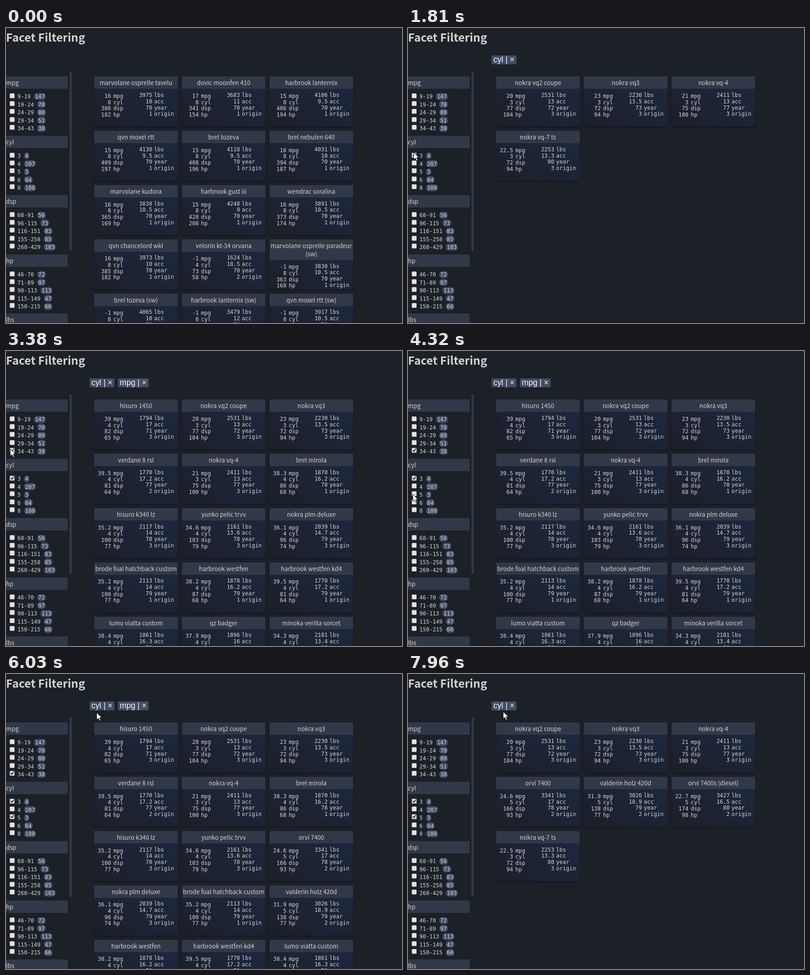
Write an HTML page that moves like this. It is 867x646 px and loops after 8000 ms.

```html
<!DOCTYPE html>
<html lang="en">
<head>
<meta charset="utf-8">
<title>Facet Filtering</title>
<style>
  html, body { margin: 0; width: 100%; height: 100%; overflow: hidden; background: #1c2027; }
  svg { display: block; width: 867px; height: 646px; }
  text { fill: #d5d3cf; font: 12px "DejaVu Sans Mono", monospace; }
  .name, .head { font: 13.2px "Noto Sans CJK JP", "Noto Sans CJK SC", "Noto Sans CJK", "Noto Sans", sans-serif; }
  .head { font-size: 24.7px; font-weight: 700; }
  .chip { font: 17.6px "Liberation Sans", Arial, sans-serif; fill: #f4f4f4; }
  .mid { text-anchor: middle; }
  .end { text-anchor: end; }
  .bar { fill: #313948; }
  .pill { fill: #414d67; }
  .box { fill: #e4e4e3; stroke: #a4a4a3; }
  .tick { fill: none; stroke: #2b2b2b; stroke-width: 2; }
  .ring { fill: none; stroke: #3d6bbb; stroke-width: 1.5; }
  .card { fill: url(#shade); filter: drop-shadow(0 1px 1px #0008); }
  .pointer { fill: #fff; stroke: #111; stroke-linejoin: round; }
  .beam { fill: none; stroke: #e8e8e8; }
</style>
</head>
<body>
<svg id="stage" viewBox="0 0 867 646"></svg>
<script>
const LOOP = 8000;
const STEP = 76.7;
const MONO = 7.22;

const namesByYear = {
  70: `marvolane osprelle tavelu, dovic moonfen 410, harbrook lanternix,
    qvn moxel rtt, brel tozeva, brel nebulen 640,
    marvolane kudora, harbrook gust iii, wendrac soralina,
    qvn chancelord wkl, velorin kt-34 orvana, marvolane osprelle paradeur|(sw),
    brel tozeva (sw), harbrook lanternix (sw), qvn moxel rtt (sw)`,
  71: 'hisuro 1450',
  72: 'nokra vq2 coupe',
  73: 'nokra vq3',
  77: 'verdane 8 rsl, nokra vq-4',
  78: 'brel mirola, hisuro k340 lz, yunko pelic trvv, orvi 7400',
  79: `nokra plm deluxe, brode foal hatchback custom, valderin holz 420d,
    harbrook westfen, harbrook westfen kd4, lumo viatta custom`,
  80: 'qz badger, minoka verilla sorcet, orvi 7400s (diesel), nokra vq-7 ts'
};

// Lightest to heaviest car for each number of cylinders
const ranges = {
  3: { mpg: [23.7, 18], dsp: [70, 80], hp: [90, 110], lbs: [2124, 2720], acc: [13.5, 12.5] },
  4: { mpg: [41.5, 34.1], dsp: [72, 105], hp: [58, 80], lbs: [1613, 2200], acc: [18.6, 13.2] },
  5: { mpg: [36.4, 20.3], dsp: [121, 183], hp: [67, 103], lbs: [2830, 3530], acc: [20.1, 15.9] },
  8: { mpg: [18, 14], dsp: [302, 455], hp: [130, 225], lbs: [3433, 4425], acc: [12, 8.5] }
};

function originOf(name) {
  if (/^(velorin|verdane|orvi|valderin|lumo)/.test(name)) return 2;
  return /^(hisuro|nokra|yunko|minoka)/.test(name) ? 3 : 1;
}

function cylindersOf(name, year, origin) {
  if (/ vq/.test(name)) return 3;
  if (/^(orvi|valderin)/.test(name)) return 5;
  return year === 70 && origin === 1 ? 8 : 4;
}

function makeCar(name, year, i) {
  const origin = originOf(name);
  const cyl = cylindersOf(name, year, origin);
  const weight = Math.abs(Math.sin(i * 12.9898 + 1) * 43758.5453) % 1;
  const spec = (key, unit = 1) => {
    const [light, heavy] = ranges[cyl][key];
    return +(Math.round((light + (heavy - light) * weight) / unit) * unit).toFixed(1);
  };
  const unrated = year === 70 && (origin === 2 || name.includes('(sw)'));
  return {
    name, year, origin, cyl,
    mpg: unrated ? -1 : spec('mpg', year < 77 ? 1 : 0.1),
    dsp: spec('dsp'), hp: spec('hp'), lbs: spec('lbs'),
    acc: spec('acc', year < 77 ? 0.5 : 0.1)
  };
}

const cars = Object.entries(namesByYear)
  .flatMap(([year, names]) => names.split(/,\s+/).map(name => [name, +year]))
  .map(([name, year], i) => makeCar(name, year, i));

const facets = {
  mpg: '9-19 147, 19-24 78, 24-29 80, 29-34 51, 34-43 38',
  cyl: '3 4, 4 207, 5 3, 6 84, 8 108',
  dsp: '68-91 56, 96-115 73, 116-151 83, 155-258 85, 260-429 103',
  hp: '46-70 72, 71-89 97, 90-113 113, 115-149 47, 150-215 66',
  lbs: ''
};

const scenes = [
  { at: 0, cyl: '', mpg: false },
  { at: 1810, cyl: '3', mpg: false },
  { at: 3380, cyl: '3', mpg: true },
  { at: 4780, cyl: '35', mpg: true },
  { at: 7270, cyl: '35', mpg: false }
];

// Stepped straight moves from the previous place
const moves = [
  { at: 190, steps: 4, x: -20, y: 240 },
  { at: 570, steps: 3, x: 18, y: 230 },
  { at: 890, steps: 7, x: 12, y: 272 },
  { at: 2050, steps: 2, x: 11, y: 295 },
  { at: 2510, steps: 1, x: 11, y: 284 },
  { at: 2660, steps: 3, x: 9, y: 214 },
  { at: 3850, steps: 7, x: 10, y: 313 },
  { at: 5480, steps: 1, x: 102, y: 314, shape: 'beam' },
  { at: 5557, steps: 5, x: 229, y: 57 },
  { at: 5940, steps: 2, x: 198, y: 84 },
  { at: 6430, steps: 1, x: 278, y: 86 },
  { at: 6580, steps: 3, x: 277, y: 66, shape: 'hand' },
  { at: 7270, steps: 3, x: 401, y: 80 },
  { at: 7730, steps: 4, x: 208, y: 82 }
];

// Whole-pixel baselines keep the small type crisp
const text = (x, y, str, cls = '') => `<text x="${x}" y="${Math.round(y)}" class="${cls}">${str}</text>`;
const rect = (x, y, w, h, cls, r = 0) =>
  `<rect x="${x}" y="${y}" width="${w}" height="${h}" rx="${r}" class="${cls}"/>`;
const facetTop = i => Math.round(106.4 + 129.75 * i);
const rowTop = (facet, row) => facetTop(facet) + 37 + 17.4 * row;

function facetPanel([title, rows], i) {
  const top = facetTop(i);
  let out = rect(0, top, 135, 27, 'bar') + text(0, top + 19, title, 'name');
  if (!rows) return out;
  rows.split(', ').forEach((row, j) => {
    const [label, count] = row.split(' ');
    const y = rowTop(i, j);
    const pillX = 25 + (label.length + 1) * MONO;
    out += rect(8.5, Math.floor(y) + 0.5, 10, 10, 'box', 1.5)
      + text(25, y + 11.3, label)
      + rect(pillX, Math.round(y) - 0.5, count.length * MONO + 4.6, 15, 'pill', 7)
      + text(pillX + 2.3, y + 11.3, count);
  });
  return out;
}

function card(car, i) {
  const x = 193 + 192 * (i % 3);
  const top = 106.4 + 118.8 * Math.floor(i / 3);
  const y = Math.round(top);
  const lines = car.name.split('|');
  const extra = 18 * (lines.length - 1);
  const column = (keys, numX, labelX, first) => keys.map((key, k) => {
    const base = top + extra + first + 13.7 * k;
    return text(x + numX, base, car[key], 'end') + text(x + labelX, base, key);
  }).join('');
  return rect(x, y, 183, 110, 'card')
    + rect(x, y, 183, 27 + extra, 'bar')
    + lines.map((s, k) => text(x + 91.5, y + 19 + 18 * k, s, 'name mid')).join('')
    + column(['mpg', 'cyl', 'dsp', 'hp'], 37, 42, 46.5)
    + column(['lbs', 'acc', 'year', 'origin'], 127.3, 131.3, 44.7);
}

const chip = (x, w, label) =>
  rect(x, 60, w, 19.5, 'pill', 2) + text(x + 4, 75, label + ' | ×', 'chip');

const tick = (facet, row) =>
  `<path class="tick" d="M10.5 ${Math.floor(rowTop(facet, row)) + 5}l2.3 2.6 4.4-5.4"/>`;

function sceneMarkup({ cyl, mpg }) {
  const open = !cyl && !mpg;
  const shown = cars.filter(c => open || cyl.includes(c.cyl) || (mpg && c.mpg >= 34));
  return shown.slice(0, 15).map(card).join('')
    + (cyl ? chip(183, 54.5, 'cyl') : '')
    + (mpg ? chip(245, 67.3, 'mpg') + tick(0, 4) : '')
    + [...cyl].map(n => tick(1, n - 3)).join('');
}

const shapes = {
  arrow: '<path class="pointer" d="M.5.5V16.2L4.2 12.8 6.8 18.6 9.4 17.4 6.8 11.8H11.8Z"/>',
  beam: '<path class="beam" d="M-3-6H-1L0-5 1-6H3M0-5V5M-3 6H-1L0 5 1 6H3"/>',
  hand: '<path class="pointer" d="M-1.5 10V1Q0-1 1.5 1V6L6.5 7.5V11L5 15.5H-1.5L-5.5 10Q-5.5 8-4 8.5Z"/>'
};

const stage = document.getElementById('stage');
stage.innerHTML = `
  <defs><linearGradient id="shade" x1="0" y1="1" x2="1" y2="0">
    <stop offset="0" stop-color="#1b1f28"/><stop offset="1" stop-color="#1d2842"/>
  </linearGradient></defs>
  ${text(0, 30, 'Facet Filtering', 'head')}
  ${Object.entries(facets).map(facetPanel).join('')}
  ${rect(139, 95, 5, 393, 'bar', 2)}
  ${scenes.map(s => `<g data-scene>${sceneMarkup(s)}</g>`).join('')}
  <g id="ring">${rect(244.7, 59.2, 68, 20.6, 'ring', 2)}</g>
  <g id="cursor">${Object.entries(shapes).map(([k, d]) => `<g data-shape="${k}">${d}</g>`).join('')}</g>`;

const groups = [...stage.querySelectorAll('[data-scene]')];
const pointers = [...stage.querySelectorAll('[data-shape]')];
const cursor = document.getElementById('cursor');
const ring = document.getElementById('ring');
const show = (el, on) => { el.style.display = on ? '' : 'none'; };

function cursorAt(t) {
  const i = moves.findLastIndex(m => m.at <= t);
  if (i < 0) return null;
  const { at, steps, x, y, shape = 'arrow' } = moves[i];
  const from = moves[i - 1] || { x: 990, y: 755 };
  const p = Math.min(1, (Math.floor((t - at) / STEP) + 1) / steps);
  const mix = (a, b) => Math.round(a + (b - a) * p);
  return { x: mix(from.x, x), y: mix(from.y, y), shape };
}

function draw(now) {
  const t = Math.max(0, now) % LOOP;
  const scene = scenes.findLastIndex(s => s.at <= t);
  const spot = cursorAt(t);
  groups.forEach((g, i) => show(g, i === scene));
  show(cursor, spot);
  if (spot) {
    pointers.forEach(p => show(p, p.dataset.shape === spot.shape));
    cursor.setAttribute('transform', `translate(${spot.x} ${spot.y})`);
  }
  show(ring, t >= 7190 && t < 7270);
  requestAnimationFrame(draw);
}
draw(performance.now());
</script>
</body>
</html>
```
